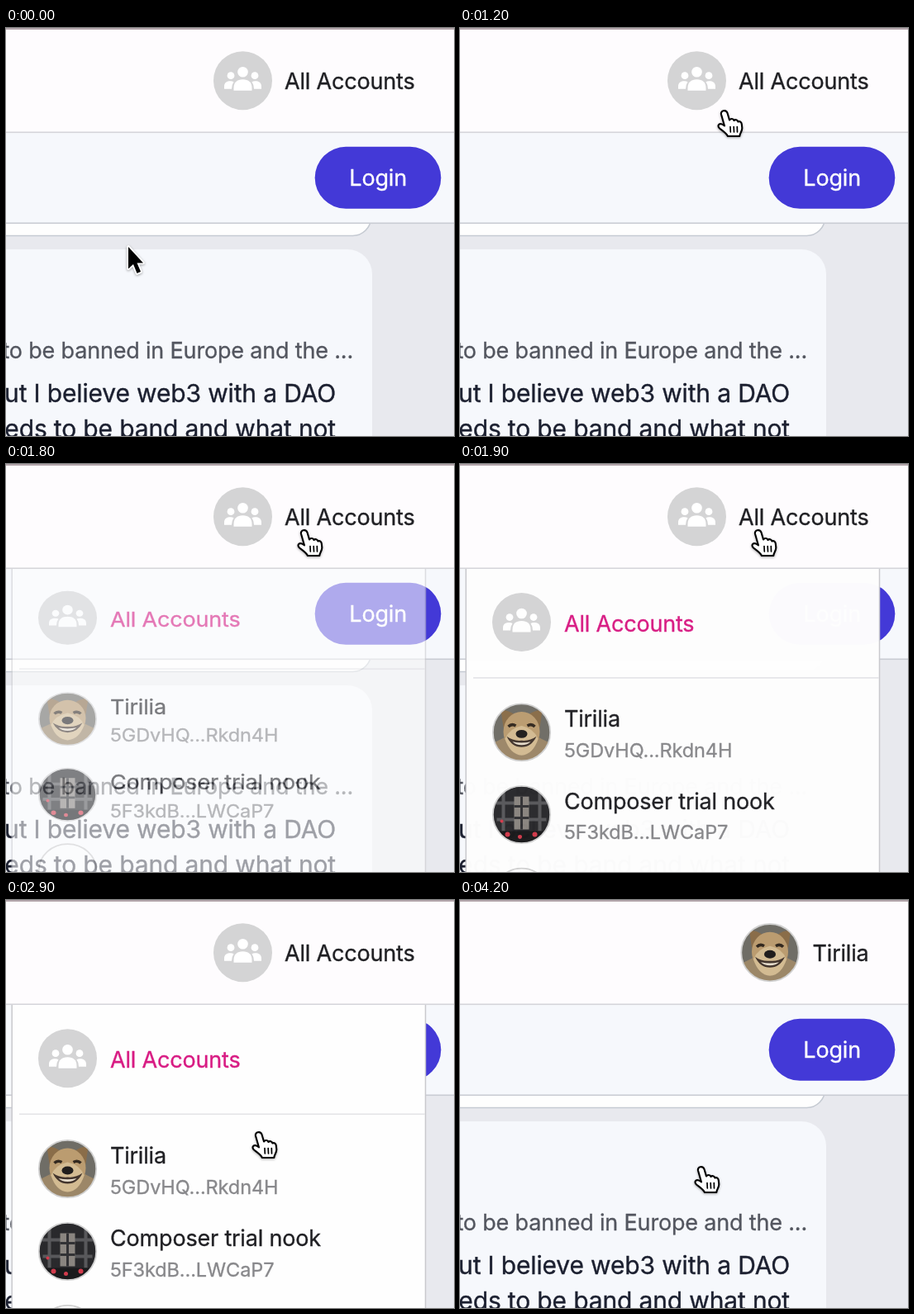
Recreate the animation shown at these times as an HTML page. Size 542 px wide and 494 px high, loop 5.7 s.

```html
<!DOCTYPE html>
<html lang="en">
<head>
<meta charset="utf-8">
<title>Account switcher</title>
<style>
  html, body { margin: 0; width: 100%; height: 100%; overflow: hidden; background: #e8e9ee; }
  svg { display: block; width: 100%; height: 100%; }
  text {
    font-family: Inter, "Liberation Sans", sans-serif; font-size: 27px; letter-spacing: -0.18px;
    color: #202024; fill: currentColor; stroke: currentColor; stroke-width: 0.35px;
  }
  .end { text-anchor: end; }
  .body { font-size: 30px; letter-spacing: -0.15px; color: #1c2030; }
  .muted { color: #53565f; }
  .addr { font-size: 23.5px; letter-spacing: -0.1px; color: #88888b; }
  .pink { color: #d81b83; }
  #cursor { filter: drop-shadow(0 1px 1.5px rgba(0, 0, 0, 0.35)); }
</style>
</head>
<body>
<svg viewBox="0 0 542 494" preserveAspectRatio="none">
  <defs>
    <clipPath id="round"><circle r="34.5"/></clipPath>

    <g id="group">
      <circle r="35.5" fill="#d4d4d5"/>
      <g fill="#fff">
        <circle cy="-10.5" r="6.300"/>
        <path d="M-11 12V9C-11 2-7-1.500 0-1.500S11 2 11 9V12Z"/>
        <circle cx="-14.500" cy="-6" r="4.400"/>
        <circle cx="14.500" cy="-6" r="4.400"/>
        <path id="side" d="M-22.500 10V7C-22.500 2-19 .500-15 .500Q-12.500.500-11 1.500Q-13.500 5-13.500 10Z"/>
        <use href="#side" transform="scale(-1 1)"/>
      </g>
    </g>

    <g id="dog">
      <g clip-path="url(#round)">
        <rect x="-36" y="-36" width="72" height="72" fill="#6f6d66"/>
        <path d="M-36 14L-20 6H20L36 14V36H-36Z" fill="#9c8768"/>
        <path d="M-22-6L-25-27Q-15-27-8-21H8Q15-27 25-27L22-6Z" fill="#8a6d49"/>
        <ellipse cy="-1" rx="22" ry="24" fill="#bb9c70"/>
        <path d="M-20 8Q-15-5 0-8Q15-5 20 8Q14 27 0 28Q-14 27-20 8Z" fill="#d3bb92"/>
        <path d="M-16-7Q-12-11-7-8M7-8Q12-11 16-7" fill="none" stroke="#33291f" stroke-width="3.500"/>
        <path d="M-18 5Q-10 11 0 10Q10 11 18 5Q12 18 0 18Q-12 18-18 5Z" fill="#43352d"/>
        <path d="M-11 11.500Q0 14 11 11.500Q7 15.500 0 15.500Q-7 15.500-11 11.500Z" fill="#e6dccb"/>
        <ellipse cy="2" rx="7" ry="5" fill="#211e1d"/>
      </g>
      <circle r="34.700" fill="none" stroke="#d0d0d0" stroke-width="1.800"/>
    </g>

    <g id="machine">
      <g clip-path="url(#round)">
        <rect x="-36" y="-36" width="72" height="72" fill="#29292c"/>
        <path d="M-36-14H36M-30 6H30M-22-30V20M22-30V20" stroke="#58585b" stroke-width="4"/>
        <rect x="-9" y="-22" width="18" height="40" fill="#8a8580"/>
        <path d="M-9-10H9M-9 4H9M0-22V18" stroke="#323235" stroke-width="3"/>
        <path d="M-36 20H36V36H-36Z" fill="#1a1a1c"/>
        <g fill="#d23b4c">
          <circle cx="-17" cy="24" r="3"/><circle cx="-2" cy="27" r="2.500"/>
          <circle cx="16" cy="24" r="3"/><circle cx="-24" cy="8" r="2"/>
        </g>
      </g>
      <circle r="34.700" fill="none" stroke="#d0d0d0" stroke-width="1.800"/>
    </g>
  </defs>

  <rect width="542" height="494" fill="#e8e9ee"/>
  <rect x="-60" y="150" width="501.500" height="101.500" rx="22" fill="#fefefe" stroke="#c5cad2" stroke-width="1.600"/>
  <rect x="-60" y="268" width="503" height="300" rx="30" fill="#f6f8fc"/>
  <text class="end muted" x="420" y="400">to be banned in Europe and the ...</text>
  <text class="end body" x="399" y="453">but I believe web3 with a DAO</text>
  <text class="end body" x="399" y="496">needs to be band and what not</text>

  <rect y="127" width="542" height="109" fill="#f6f8fc"/>
  <rect y="235.500" width="542" height="1.600" fill="#c9ccd3"/>
  <rect x="373.700" y="143.800" width="152.600" height="75" rx="37.500" fill="#4339d7"/>
  <text x="415.300" y="191" style="color:#fff">Login</text>

  <rect width="542" height="126" fill="#fefcfe"/>
  <rect width="542" height="2" fill="#b3a6ab"/>
  <rect y="125.500" width="542" height="1.600" fill="#d5d5da"/>
  <g id="all">
    <use href="#group" x="286.500" y="63.700"/>
    <text class="end" x="494.500" y="74">All Accounts</text>
  </g>
  <g id="picked">
    <use href="#dog" x="375" y="63.700"/>
    <text class="end" x="494.500" y="74">Tirilia</text>
  </g>

  <g id="menu">
    <rect x="7.200" y="127" width="500.300" height="420" fill="#fefefe"/>
    <path d="M7.200 127V540M507.500 127V540" stroke="#c9c9cd" stroke-width="1.500"/>
    <use href="#group" x="74.500" y="191.700"/>
    <text class="pink" x="126" y="203">All Accounts</text>
    <rect x="16" y="258.500" width="491" height="1.600" fill="#e4e4e7"/>
    <rect id="hover" x="16" y="275" width="481" height="101" fill="#fafafa"/>
    <use href="#dog" x="74.500" y="325.500"/>
    <text id="name" x="126" y="319">Tirilia</text>
    <text class="addr" x="126" y="355.500">5GDvHQ...Rkdn4H</text>
    <use href="#machine" x="74.500" y="425.500"/>
    <text x="126" y="418.500">Composer trial nook</text>
    <text class="addr" x="126" y="455.500">5F3kdB...LWCaP7</text>
    <circle cx="74.500" cy="525.500" r="34.700" fill="#fff" stroke="#d0d0d0" stroke-width="1.800"/>
  </g>

  <g id="cursor">
    <path id="arrow" d="M0 0V26.500L6 21L10.500 32L15 30L10.500 19.500H18Z" fill="#000" stroke="#fff" stroke-width="3.600" stroke-linejoin="round" paint-order="stroke"/>
    <g id="hand" stroke="#000" stroke-width="2.100" stroke-linejoin="round" stroke-linecap="round">
      <path fill="#fff" d="M-4 4.500C-5-.500 2-1.500 3.500 3L6 11.500C7.500 9.500 10.500 9.500 11.500 12C13 10.500 15.500 11 16.500 13.500C18.500 12.500 20.500 14 20.800 16.500L21.300 21C21.500 25.500 18.500 27 18.300 31H4C2.500 27.500-2 24.500-6 21.500C-9 18.500-7 15-3 16.500L0 18.500Z"/>
      <path fill="none" stroke-width="1.700" d="M7 19.500L7.300 26M11.200 19.500L11.500 26M15.300 19.500L15.500 26"/>
    </g>
  </g>
</svg>
<script>
  const LOOP = 5700, STEP = 100;
  const OPEN = 1800, HOVER = 3000, PICK = 4200, HAND = 1200;

  // Pointer hotspot: time, x, y
  const path = [
    [400, 148, 265], [600, 153, 260], [800, 174, 236], [900, 197, 211],
    [1000, 236, 162], [1100, 281, 122], [1200, 320, 100], [1300, 345, 88],
    [1400, 356, 82], [1600, 361, 80], [2300, 361, 80], [2400, 358, 92],
    [2600, 343, 153], [2800, 328, 234], [2900, 306, 281], [3000, 300, 301],
    [3100, 296, 314], [3300, 292, 323]
  ];

  const $ = id => document.getElementById(id);
  const [all, picked, menu, hover, name, cursor, arrow, hand] =
    ["all", "picked", "menu", "hover", "name", "cursor", "arrow", "hand"].map($);

  const clamp = v => Math.max(0, Math.min(1, v));
  const mix = (a, b, p) => a + (b - a) * p;
  const easeOut = p => 1 - (1 - p) ** 3;
  const show = (el, on) => el.setAttribute("display", on ? "inline" : "none");

  function pointer(t) {
    const i = path.findIndex(k => k[0] > t);
    if (i === 0) return path[0].slice(1);
    if (i < 0) return path[path.length - 1].slice(1);
    const [a, b] = [path[i - 1], path[i]];
    const p = (t - a[0]) / (b[0] - a[0]);
    return [mix(a[1], b[1], p), mix(a[2], b[2], p)];
  }

  function draw(t) {
    show(all, t < PICK);
    show(picked, t >= PICK);

    show(menu, t >= OPEN && t < PICK);
    const open = easeOut(clamp((t - OPEN + 50) / 200));
    menu.setAttribute("opacity", open);
    menu.setAttribute("transform", `translate(0 127) scale(1 ${mix(0.8, 1, open)}) translate(0 -127)`);

    const lit = easeOut(clamp((t - HOVER + STEP) / 400));
    const shade = t < HOVER ? 0 : lit;
    hover.setAttribute("opacity", shade);
    name.style.color = `rgb(${mix(32, 216, shade)}, ${mix(32, 27, shade)}, ${mix(36, 131, shade)})`;

    cursor.setAttribute("transform", `translate(${pointer(t)})`);
    show(arrow, t < HAND);
    show(hand, t >= HAND);
  }

  const start = performance.now();
  function tick() {
    const t = (performance.now() - start) % LOOP;
    draw(Math.floor(t / STEP) * STEP);
    requestAnimationFrame(tick);
  }
  draw(0);
  requestAnimationFrame(tick);
</script>
</body>
</html>
```
